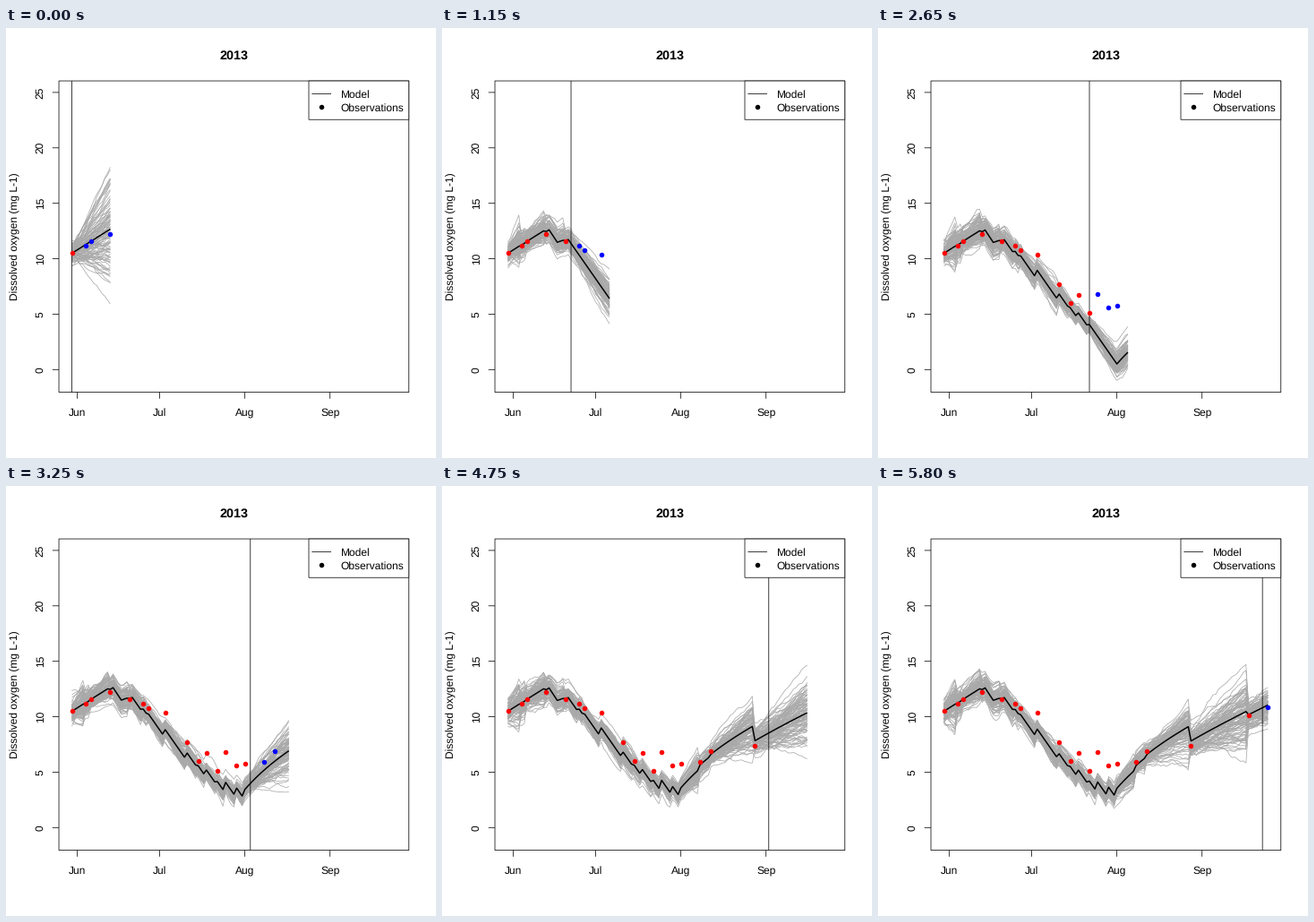
Animation, 480 px wide and 480 px high, one loop 5850 ms. Source, as a matplotlib script:

```python
import numpy as np
import matplotlib.pyplot as plt
from matplotlib.animation import FuncAnimation
from matplotlib.collections import LineCollection
from matplotlib.patches import Rectangle

SIZE, DPI = 480, 96
PT = 72 / DPI                      # points per pixel
LEFT, RIGHT, TOP, BOTTOM = 59.04, 449.76, 59.04, 406.56
LAST, HORIZON, MEMBERS = 118, 14, 100
FRAMES = 117
OBS_VAR, NOISE = 0.5, 0.11         # observation variance, daily noise

OBS = {0: 10.49, 5: 11.21, 7: 11.62, 14: 12.25, 21: 11.54, 26: 11.2, 28: 10.74,
       34: 10.38, 42: 7.73, 46: 6.0, 49: 6.76, 53: 5.08, 56: 6.79, 60: 5.63,
       63: 5.8, 70: 5.92, 74: 6.89, 90: 7.34, 111: 10.12, 118: 10.88}

plt.rcParams.update({"font.family": "Liberation Sans", "text.hinting": "none",
                     "lines.solid_capstyle": "butt"})


def px(day):
    step = (RIGHT - LEFT) / 1.08 / LAST
    return LEFT + (day + 0.04 * LAST) * step


def py(value):
    return BOTTOM - (value + 2.04) * (BOTTOM - TOP) / 28.08


def trend(day):
    """Daily change: spring rise, short dip, summer decline, slowing recovery."""
    for end, rate in ((15, 0.156), (18, -0.375), (22, 0.085), (63, -0.355)):
        if day <= end:
            return rate
    return 0.12 + 0.17 * np.exp((63 - day) / 14)


def slope_sd(day):
    """Uncertainty of the trend, learned early and renewed in the recovery."""
    return 0.032 + 0.14 * np.exp(-day / 6) + 0.035 * (day > 60)


def simulate(now):
    """Ensemble Kalman filter up to now, then a free forecast."""
    rng = np.random.default_rng(2013 + now)
    end = min(now + HORIZON, LAST)
    mean = np.empty(end + 1)
    dev = np.empty((end + 1, MEMBERS))
    mean[0] = OBS[0]
    dev[0] = rng.normal(0, 0.5, MEMBERS)
    slope = rng.normal(0, slope_sd(0), MEMBERS)
    for d in range(1, end + 1):
        mean[d] = mean[d - 1] + trend(d)
        dev[d] = dev[d - 1] + slope + rng.normal(0, NOISE, MEMBERS)
        if d in OBS and d <= now:
            gain = dev[d].var() / (dev[d].var() + OBS_VAR)
            mean[d] += gain * (OBS[d] - mean[d])
            error = rng.normal(0, OBS_VAR ** 0.5, MEMBERS)
            dev[d] += gain * (error - dev[d])
            slope = rng.normal(0, slope_sd(d), MEMBERS)
    return mean, mean[:, None] + dev


fig = plt.figure(figsize=(SIZE / DPI, SIZE / DPI), dpi=DPI, facecolor="white")
ax = fig.add_axes([0, 0, 1, 1])
ax.set(xlim=(0, SIZE), ylim=(SIZE, 0))
ax.axis("off")


def line(xs, ys, width=0.75, z=5):
    return ax.plot(xs, ys, color="black", lw=width * PT, zorder=z, snap=False)[0]


def text(x, y, s, size=12, ha="center", **kw):
    ax.text(x, y, s, fontsize=size * PT, ha=ha, va="baseline",
            rotation_mode="anchor", zorder=9, **kw)


def dots(color, z=6):
    return ax.plot([], [], "o", color=color, ms=5.5 * PT, mew=0, zorder=z,
                   snap=False)[0]


def box(x, y, fill, z):
    ax.add_patch(Rectangle((x, TOP), RIGHT - x, y - TOP, fc=fill, ec="black",
                           lw=0.75 * PT, zorder=z, snap=False))


# Frame, axes and labels
box(LEFT, BOTTOM, "none", 5)
for day, month in ((2, "Jun"), (32, "Jul"), (63, "Aug"), (94, "Sep")):
    line([px(day)] * 2, [BOTTOM, BOTTOM + 7.2])
    text(px(day), 433, month)
for v in range(0, 26, 5):
    line([LEFT - 7.2, LEFT], [py(v)] * 2)
    text(41.5, py(v), str(v), rotation=90)
text(13.5, (TOP + BOTTOM) / 2, "Dissolved oxygen (mg L-1)", rotation=90)
text((LEFT + RIGHT) / 2, 35, "2013", 14.4, weight="bold")

# Legend
box(338, 102.24, "white", 7)
line([341.4, 363], [73.44] * 2, z=8)
dots("black", 8).set_data([352.2], [87.84])
text(373.4, 78, "Model", ha="left")
text(373.4, 93, "Observations", ha="left")

members = LineCollection([], colors="darkgray", linewidths=0.75 * PT, zorder=2)
ax.add_collection(members)
mean_line = line([], [], 1.5, 3)
now_line = line([], [], z=4)
past, future = dots("red"), dots("blue")


def draw(now):
    mean, runs = simulate(now)
    xs = px(np.arange(len(mean)))
    members.set_segments([np.column_stack([xs, py(r)]) for r in runs.T])
    mean_line.set_data(xs, py(mean))
    now_line.set_data([px(now)] * 2, [TOP, BOTTOM])
    for pts, lo, hi in ((past, 0, now), (future, now + 1, now + HORIZON)):
        days = [d for d in OBS if lo <= d <= hi]
        pts.set_data([px(d) for d in days], [py(OBS[d]) for d in days])
    return members, mean_line, now_line, past, future


anim = FuncAnimation(fig, draw, frames=FRAMES, interval=50, repeat=True)
plt.show()
```
